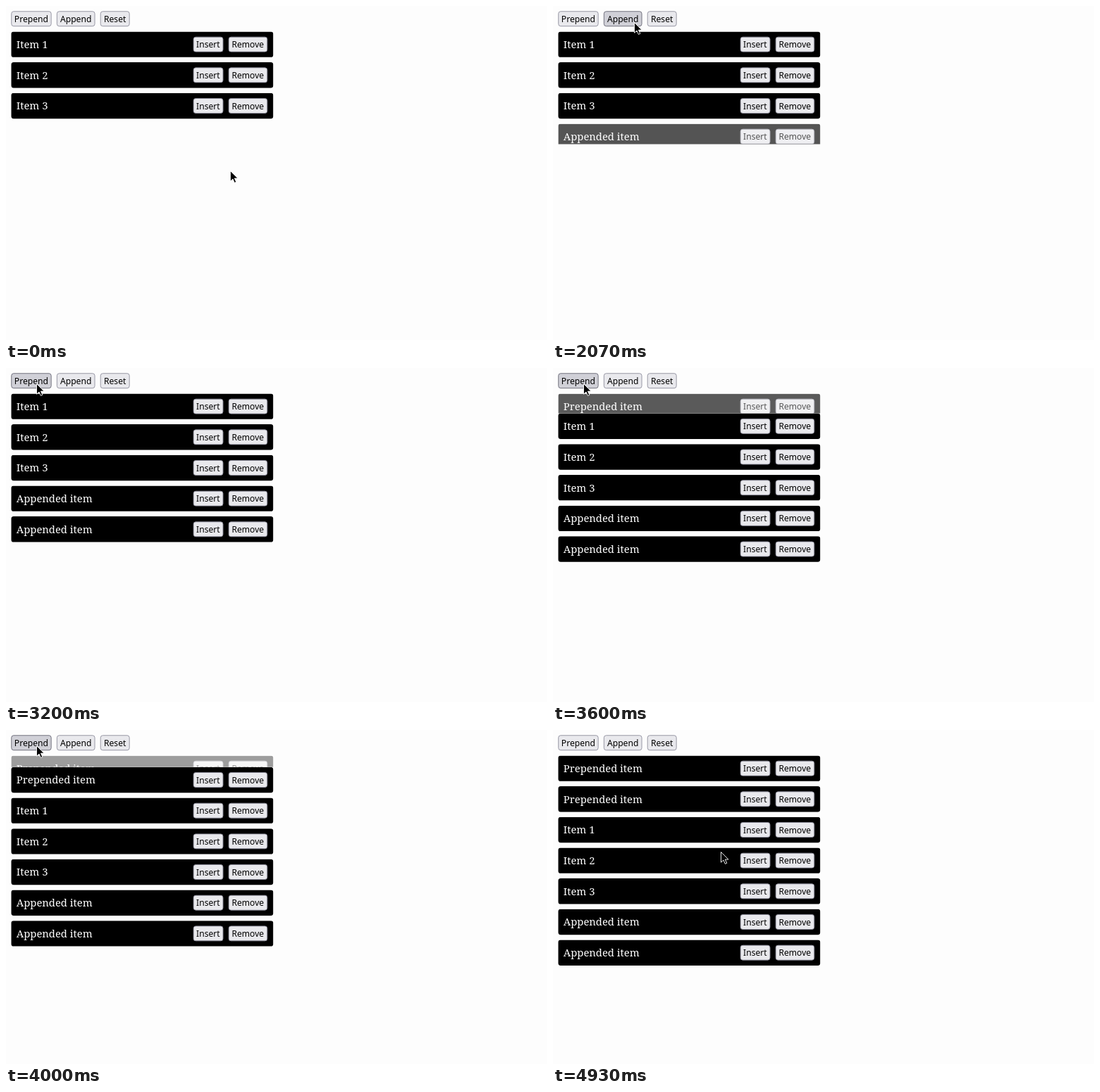
Animation of 768 by 475 pixels, one loop 4.99 s. Source, as an HTML page:

```html
<!DOCTYPE html>
<html lang="en">
<head>
<meta charset="utf-8">
<title>Animated list</title>
<style>
  html, body { margin: 0; width: 100%; height: 100%; overflow: hidden; }
  body { position: relative; background: #fdfdfd; --t: 0; }

  .page {
    position: absolute; left: 0; top: 0; width: 844px; height: 522px;
    transform: scale(.91); transform-origin: 0 0;
  }

  .button {
    position: absolute; box-sizing: border-box; height: 24px;
    border: 1px solid #8f8f9d; border-radius: 4px; background: #e9e9ed;
    color: #000; font: 13.333px/22.6px "Noto Sans", sans-serif;
    text-align: center; white-space: nowrap;
  }
  .toolbar .button { top: 8px; }
  .prepend { left: 8px; width: 63px; --start: 3190; --for: 1330; }
  .append { left: 79px; width: 60px; --start: 1320; --for: 1570; }
  .reset { left: 147px; width: 46px; }
  .insert { left: 283.5px; top: 8px; width: 47.5px; }
  .remove { left: 338.5px; top: 8px; width: 61.5px; }

  .list { position: absolute; left: 8px; top: 40px; width: 408.5px; }
  .slot { height: 48px; overflow: hidden; }
  .item {
    position: relative; height: 40px; border-radius: 4px; background: #000;
    color: #fff; font: 16.25px/40px "Noto Serif", serif; text-indent: 8.3px;
  }
  .item .button { text-indent: 0; }

  .cursor { position: absolute; left: 0; top: 0; overflow: visible; }

  /* Paused animations are positioned by --t through their delay. */
  .entering, .prepend, .append, .cursor {
    animation-play-state: paused !important;
    animation-delay: calc((var(--start, 0) - var(--t)) * 1ms) !important;
  }
  .entering { animation: enter 400ms ease both; }
  .prepend, .append { animation: hover calc(var(--for) * 1ms) linear; }
  .cursor { animation: wander 4990ms linear both; }

  @keyframes enter { from { height: 0; opacity: 0; } }
  @keyframes hover {
    from, to { background: #d0d0d7; border-color: #676774; }
  }
  @keyframes wander {
    0%, 13.4%    { transform: translate(318px, 234px); }
    16%          { transform: translate(294px, 211px); }
    20%          { transform: translate(200px, 112px); }
    22.7%        { transform: translate(143px, 59px); }
    25.4%        { transform: translate(121px, 32px); }
    28.1%        { transform: translate(116px, 25px); }
    33.5%, 45.5% { transform: translate(115px, 23px); }
    48.1%        { transform: translate(108px, 24px); }
    50.7%, 56.1% { transform: translate(106px, 24px); }
    60.1%, 88.2% { transform: translate(43px, 22px); }
    92.2%        { transform: translate(82px, 48px); }
    94.8%        { transform: translate(150px, 103px); }
    96.2%        { transform: translate(190px, 136px); }
    98.8%, 100%  { transform: translate(238px, 173px); }
  }
</style>
</head>
<body>
<div class="page">
  <div class="toolbar">
    <div class="button prepend">Prepend</div>
    <div class="button append">Append</div>
    <div class="button reset">Reset</div>
  </div>
  <div class="list"></div>
</div>
<svg class="cursor" width="12" height="19">
  <path d="M.5 .5V15.2L4 12L6.4 17.4L8.8 16.3L6.4 11.1H11Z"
        fill="#000" stroke="#fff" stroke-width=".9"/>
</svg>
<script>
  const LOOP = 4990;
  const FPS = 15;

  // Label and, for items added later, the time they enter.
  const items = [
    ["Prepended item", 3905],
    ["Prepended item", 3450],
    ["Item 1"], ["Item 2"], ["Item 3"],
    ["Appended item", 1910],
    ["Appended item", 2372],
  ];

  document.querySelector(".list").innerHTML = items.map(([label, start]) => `
    <div class="slot ${start ? "entering" : ""}" style="--start: ${start || 0}">
      <div class="item">${label}
        <div class="button insert">Insert</div>
        <div class="button remove">Remove</div>
      </div>
    </div>`).join("");

  const origin = performance.now();

  function render() {
    const time = (performance.now() - origin) % LOOP;
    const step = Math.floor((time + 4) * FPS / 1000);
    document.body.style.setProperty("--t", step * 1000 / FPS);
    requestAnimationFrame(render);
  }
  render();
</script>
</body>
</html>
```
